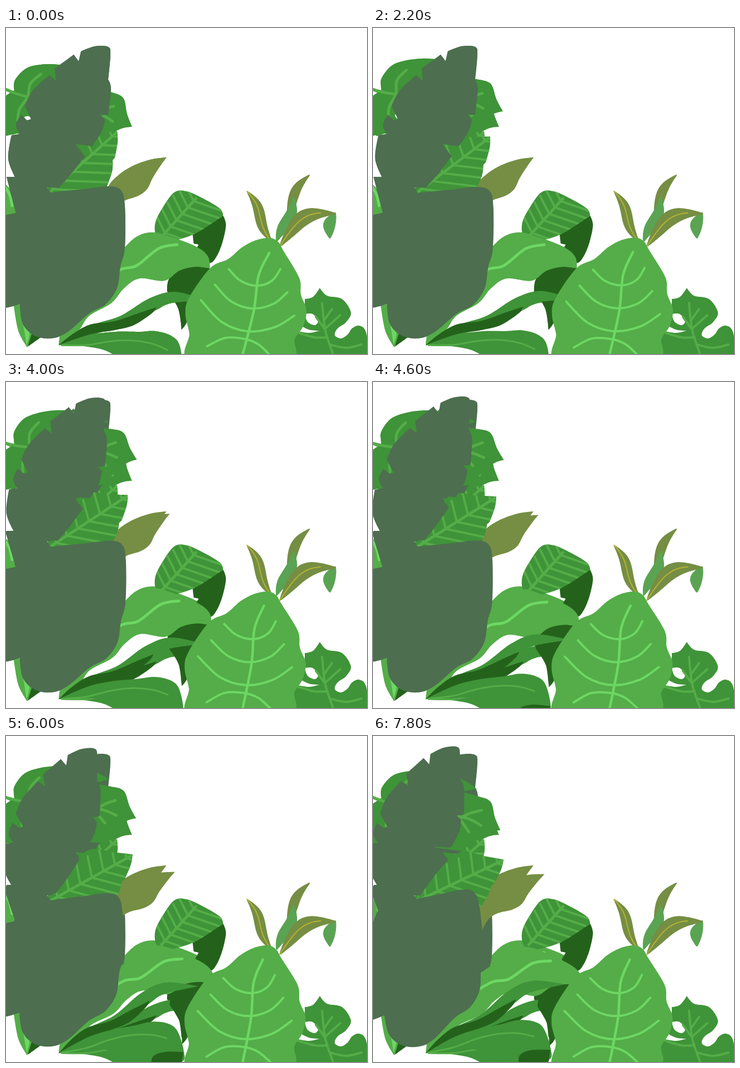
An HTML page that plays this animation: 650 by 587 pixels, repeating every 8 s.

```html
<!DOCTYPE html>
<html lang="en">
<head>
<meta charset="utf-8">
<title>Leaves</title>
<style>
html, body { margin: 0; width: 100%; height: 100%; overflow: hidden; background: #fff; }
svg { display: block; width: 650px; height: 587px; }
path { stroke-linecap: round; stroke-linejoin: round; }
</style>
</head>
<body>
<svg id="stage" viewBox="0 0 650 587"></svg>
<script>
const GRAY = '#4d6e4f', GREEN = '#3f9338', LIGHT = '#54ad48', BRIGHT = '#6dd764',
      DARK = '#24621b', OLIVE = '#758e43', YELLOW = '#b5b131', TEAL = '#5aa353', WHITE = '#fff';
const LOOP = 8, STEP = 0.2;

// Smooth curve through "x,y" points; a trailing ! makes a sharp corner.
function curve(text, closed) {
  const pts = text.trim().split(/\s+/).map(s => {
    const [x, y] = s.split(',').map(parseFloat);
    return { x, y, sharp: s.endsWith('!') };
  });
  const n = pts.length;
  const at = i => closed ? pts[(i + n) % n] : pts[Math.max(0, Math.min(n - 1, i))];
  const handle = (i, dir) => {
    const p = at(i), a = at(i - 1), b = at(i + 1), k = p.sharp ? 0 : dir / 6;
    return `${(p.x + (b.x - a.x) * k).toFixed(1)},${(p.y + (b.y - a.y) * k).toFixed(1)}`;
  };
  let d = `M${pts[0].x},${pts[0].y}`;
  for (let i = 0; i < (closed ? n : n - 1); i++)
    d += `C${handle(i, 1)} ${handle(i + 1, -1)} ${at(i + 1).x},${at(i + 1).y}`;
  return d + (closed ? 'Z' : '');
}
const fill = (color, pts) => `<path fill="${color}" d="${curve(pts, true)}"/>`;
const stroke = (color, width, d) => `<path fill="none" stroke="${color}" stroke-width="${width}" d="${d}"/>`;
const vein = (color, width, ...lines) => stroke(color, width, lines.map(l => curve(l)).join(''));
const range = n => Array.from({ length: n }, (_, i) => i);

// Leaf outline with evenly spaced ribs on both sides of a midrib, cut off at the edge.
function ribbed(id, outline, [x0, y0], [x1, y1], count, [ax, ay], [bx, by]) {
  const ribs = range(count).map(i => {
    const u = (i + 0.6) / count, x = x0 + (x1 - x0) * u, y = y0 + (y1 - y0) * u;
    return `M${x + ax},${y + ay}L${x},${y}l${bx},${by}`;
  }).join('');
  return `<clipPath id="${id}"><path d="${curve(outline, true)}"/></clipPath>` + fill(GREEN, outline) +
    `<g clip-path="url(#${id})">${stroke(LIGHT, 4, ribs)}${stroke(LIGHT, 5, `M${x0},${y0}L${x1},${y1}`)}</g>`;
}

// Slender leaf along a bowed, wavy spine; veinEnd > 0 adds a midrib.
function blade(color, [x0, y0], [x1, y1], half, bow, wave, veinEnd = 0) {
  const dx = x1 - x0, dy = y1 - y0, len = Math.hypot(dx, dy);
  const point = (u, side) => {
    const s = Math.sin(Math.PI * u);
    const off = bow * s + wave * Math.sin(2 * Math.PI * u) + side * half * Math.max(0, s) ** 0.8;
    return `${(x0 + dx * u - dy / len * off).toFixed(1)},${(y0 + dy * u + dx / len * off).toFixed(1)}`;
  };
  const side = (k, end = 1) => range(9).map(i => point(i / 8 * end, k));
  const outline = [...side(1), ...side(-1).slice(1, -1).reverse()].join(' ');
  return fill(color, outline) + (veinEnd ? vein(YELLOW, 2, side(0, veinEnd).join(' ')) : '');
}

const sprout =
  fill(LIGHT, '-5,280! 8,292 18,334! -5,345!') +
  vein(BRIGHT, 5, '0,288 7,302 11,320') +
  fill(LIGHT, '14,500! 35,495! 50,540 38,575! 22,545') +
  fill(BRIGHT, '27,515! 42,545 37,570! 33,545') +
  fill(DARK, '39,574! 48,545! 64,556!');

const heart =
  fill(GREEN, `-5,195! -5,125! 15,112! 16,94 36,73 62,66 95,66 130,73 165,86 187,102!
    157,106! 188,115 211,126 218,155 227,178! 203,183 155,213! 20,190!`) +
  vein(LIGHT, 5, '-4,109 18,118 42,125', '40,125 44,100 63,83', '37,128 24,147 21,166',
    '153,154 175,145 194,141', '150,150 172,156 192,168', '156,157 170,179') +
  fill(WHITE, '33,161 41,159 46,164 38,169');

const olive = fill(OLIVE, `289,233! 260,237 225,250 199,268 183,288 165,335 185,352!
  196,325 213,311 238,302 254,290 264,270 278,248`);

const striped = ribbed('striped', `72,298! 98,229 124,194 164,190 200,186! 201,205 196,233!
  192,238! 191,258 181,287! 150,291 110,298`, [74, 300], [198, 189], 7, [-16, -36], [80, 3]);

const tall = fill(GRAY, `184,34 188,48 184,93! 189,110 184,156! 171,157! 178,165! 173,185 155,213!
  125,209! 142,231! 118,262 95,288! 74,287! 82,298! 80,380! 18,333! 1,268! 16,268! 4,235 10,193!
  25,191! 18,175 27,156! 38,166! 45,164! 34,140! 48,113 78,85! 90,95! 88,73! 122,48! 131,60! 135,42! 160,33`);

const fold =
  fill(DARK, '391,338! 396,355 390,385 380,410 368,423 350,415 340,402! 347,390! 338,388! 336,371!') +
  ribbed('fold', '270,374 269,350 283,322 303,296 325,294 355,307 385,325 391,338! 345,368 310,381 282,385',
    [280, 376], [342, 307], 6, [-16, -32], [70, 24]);

const broad =
  fill(DARK, '367,432! 340,430 310,437 293,453 290,474! 310,505 316,543! 326,528 333,490 360,470') +
  fill(LIGHT, `95,572! 100,540 118,500 150,450 205,403 235,376 265,368 300,377 345,395 364,412
    367,433! 340,430 312,437 285,455 240,451 212,469 190,495 150,518 130,545`) +
  vein(BRIGHT, 5, '165,462 206,435 235,428 275,397 308,390');

const ribbon =
  fill(GREEN, '95,571! 150,537 205,519 258,487 305,475 362,491! 300,495 270,508 230,530 180,545') +
  fill(DARK, '95,571! 120,551 152,534 195,528 240,513 271,503! 262,514 230,535 195,544 150,552');

const low =
  fill(GREEN, '95,571! 150,553 197,547 238,547 270,546 297,554 312,570 317,607 309,627 258,620 220,604 180,581 140,573') +
  fill(DARK, '316,610! 287,604 267,605 257,613 256,630! 309,630!') +
  vein(LIGHT, 3, '100,571 145,571 190,564 230,563 265,569 291,580');

const blob = fill(GRAY, `-60,350! 18,333! 30,310! 80,297 140,290 185,285 207,292 214,320 214,395
  206,430 200,468 180,497 150,514 110,548 80,559 50,553 30,532 25,497! -10,505 -60,500!`);

const monstera =
  fill(GREEN, `538,488! 553,484 565,468! 578,482 605,488 621,512 612,530 597,541
    592,553 603,559 615,552 623,541 636,536 648,547 655,590! 505,592! 515,565 535,515`) +
  fill(WHITE, '538,515! 552,515 562,527 556,535 543,529') +
  fill(WHITE, '526,533! 545,543 564,545! 545,549 522,545!') +
  vein(LIGHT, 4, '569,495 575,545 590,590', '573,526 587,506', '574,542 602,517',
    '573,541 558,520', '579,557 555,557 524,548', '583,570 612,576 640,570');

const tuft =
  blade(OLIVE, [434, 294], [479, 385], 10, -1, -4, 0.95) +
  blade(OLIVE, [547, 264], [506, 347], 9, 9, 2) +
  blade(TEAL, [518, 304], [487, 385], 11, -5, -3) +
  blade(TEAL, [593, 332], [583, 379], 11, 6, 0) +
  blade(OLIVE, [493, 393], [594, 334], 14, -22, 2, 0.8);

const pear = fill(LIGHT, `475,378 490,385 500,402 528,450 531,480 541,508 535,537 520,560 506,600
  335,600 330,550 323,515 330,485 368,432 400,416 425,395 450,382`);

const arcs = range(3).map(i => {
  const left = [401 - 25 * i, 434 + 28 * i], right = [494 + 12.5 * i, 434 + 42 * i];
  return `${left} ${422 - 17 * i},${455 + 37 * i} ${452 - 9 * i},${464 + 41 * i} ${479 + 2 * i},${455 + 42 * i} ${right}`;
});
const pearVeins =
  vein(BRIGHT, 4.5, '474,405 455,445 446,510 425,592') +
  vein(BRIGHT, 4, ...arcs, '362,573 395,558 430,560 455,570 478,592');

// Angles in degrees as functions of seconds.
const ramp = (t, from, to) => Math.max(0, Math.min(1, (t - from) / (to - from)));
const smooth = (t, from, to) => { const u = ramp(t, from, to); return u * u * (3 - 2 * u); };
const wave = (t, half) => Math.sin(Math.PI * t / half);
const late = t => smooth(t, 1.8, 8);
const lift = t => smooth(t, 1.5, 7);
const settle = t => Math.sin(Math.PI / 2 * ramp(t, 0, 6.5));
const still = () => 0;

// Back to front; leaves marked "rests" also leave an unmoved copy below all the others.
const leaves = [
  { art: sprout, angle: still },
  { art: monstera, angle: still },
  { art: heart, pivot: [0, 105], angle: t => -9.4 * wave(t, 8.4), rests: true },
  { art: olive, pivot: [140, 440], angle: t => 5.7 * late(t), rests: true },
  { art: striped, pivot: [92, 325], angle: t => 16.5 * t / 7.8, rests: true },
  { art: tall, pivot: [25, 350], angle: t => -5.8 * late(t), rests: true },
  { art: fold, angle: still },
  { art: broad, pivot: [100, 570], angle: t => 4 * late(t), rests: true },
  { art: ribbon, pivot: [95, 571], angle: t => -9.7 * lift(t), rests: true },
  { art: low, pivot: [95, 571], angle: t => -11.5 * lift(t), rests: true },
  { art: blob, pivot: [85, 548], angle: t => 0.7 * wave(t, 5.2) - 4.7 * ramp(t, 4.8, 7.8) ** 2, rests: true },
  { art: tuft, angle: still },
  { art: pear, pivot: [430, 590], angle: t => -1.2 * settle(t) },
  { art: pearVeins, pivot: [430, 590], angle: t => -3.6 * settle(t) }
];

const stage = document.getElementById('stage');
stage.innerHTML = sprout + leaves.filter(l => l.rests).map(l => l.art).join('') +
  leaves.slice(1).map(l => `<g class="leaf">${l.art}</g>`).join('');
const nodes = stage.querySelectorAll('.leaf');

const start = performance.now();
function draw(now) {
  const seconds = Math.max(0, now - start) / 1000 % LOOP;
  const t = Math.floor(seconds / STEP + 1e-6) * STEP;
  leaves.slice(1).forEach(({ pivot = [0, 0], angle }, i) =>
    nodes[i].setAttribute('transform', `rotate(${angle(t).toFixed(3)} ${pivot})`));
  requestAnimationFrame(draw);
}
draw(start);
</script>
</body>
</html>
```
